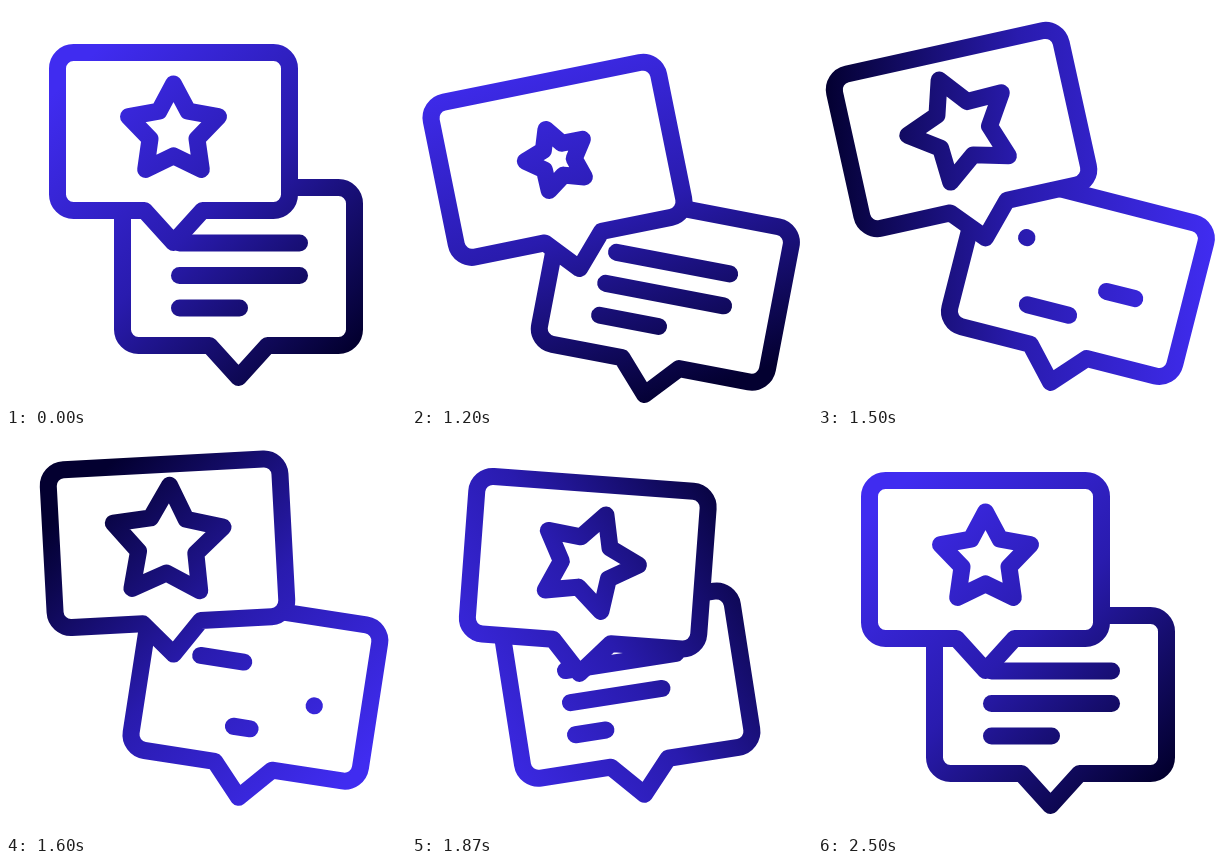
Animation of 400 by 400 pixels, one loop 2.52 s. Source, as an HTML page with a canvas:

```html
<!DOCTYPE html>
<html lang="en">
<head>
<meta charset="utf-8">
<title>Review bubbles</title>
<style>
  html, body { margin: 0; width: 100%; height: 100%; overflow: hidden; background: #fff; }
  canvas { display: block; }
</style>
</head>
<body>
<canvas width="400" height="400"></canvas>
<script>
const ctx = document.querySelector('canvas').getContext('2d');
const LOOP = 2520, DEG = Math.PI / 180;
const clamp = x => Math.min(1, Math.max(0, x));

// Smooth curve through alternating times and values, flat at every extreme.
function track(...keys) {
  const t = keys.filter((_, i) => i % 2 === 0);
  const v = keys.filter((_, i) => i % 2);
  const rate = i => (v[i + 1] - v[i]) / (t[i + 1] - t[i]);
  const slope = t.map((_, i) => {
    if (i === 0 || i === t.length - 1) return 0;
    const a = rate(i - 1), b = rate(i);
    return a * b > 0 ? 2 * a * b / (a + b) : 0;
  });
  return time => {
    if (time <= t[0]) return v[0];
    const i = t.findIndex(k => k > time) - 1;
    if (i < 0) return v[v.length - 1];
    const span = t[i + 1] - t[i], u = (time - t[i]) / span, w = 1 - u;
    return v[i] * w * w * (1 + 2 * u) + v[i + 1] * u * u * (3 - 2 * u)
      + span * u * w * (slope[i] * w - slope[i + 1] * u);
  };
}

const front = {
  x: 167.5, y: 236.5,
  turn: track(1000, 0, 1200, -11.4, 1350, -14.8, 1500, -12.5, 1700, 6.8, 1765, 8.5, 2020, -2.8, 2100, -2, 2350, 0),
  drop: track(1000, 0, 1200, 26, 1225, 27, 1500, -4.5, 1620, -17, 1700, -12, 1950, 6, 2100, 0.4, 2200, 0)
};
const back = {
  x: 232.5, y: 371.5,
  turn: track(1000, 0, 1200, 10.8, 1440, 14.8, 1500, 14.3, 1550, 12.8, 1700, -1.3, 1850, -9, 2100, 0.7, 2220, 3, 2500, 0),
  drop: track(1000, 0, 1200, 17, 1290, 24, 1500, 5, 1700, -18.5, 1730, -19.5, 2100, 8.5, 2115, 8.7, 2500, 0)
};
const starTurn = track(1000, 0, 1200, -9.6, 1350, -14, 1500, -12, 1700, 24.6, 1765, 28, 2040, -6, 2100, -5.1, 2400, 0);
const starSize = track(1000, 1, 1200, 0.68, 1250, 0.63, 1500, 1.14, 1600, 1.22, 1700, 1.163, 2100, 1);
const lightTurn = track(1000, 45, 1200, 70, 1500, 180, 1700, 267, 2100, 385, 2500, 405);

// Bubble outline with the tip of its tail at the origin.
const outline = new Path2D();
outline.moveTo(0, 0);
outline.lineTo(-29, -32);
for (const [x1, y1, x2, y2] of [
  [-116, -32, -116, -111], [-116, -190, 0, -190],
  [116, -190, 116, -111], [116, -32, 29, -32]
]) outline.arcTo(x1, y1, x2, y2, 16);
outline.lineTo(29, -32);
outline.closePath();

function drawBubble({ x, y, turn, drop }, time, content) {
  ctx.save();
  ctx.translate(x, y + drop(time));
  ctx.rotate(turn(time) * DEG);
  ctx.fill(outline);
  ctx.stroke(outline);
  content(time);
  ctx.restore();
}

function drawLines(time) {
  [120, 120, 60].forEach((length, i) => {
    const y = -134.5 + i * 32.5, local = time - i * 110;
    const erase = clamp((local - 1160) / 340);
    const grow = clamp((local - 1500) / 500);
    const growing = local >= 1500;
    const from = growing ? 0 : erase * erase * (3 - 2 * erase);
    const to = growing ? 1 - (1 - grow) ** 2 : 1;
    ctx.beginPath();
    ctx.moveTo(-59 + from * length, y);
    ctx.lineTo(-58.99 + to * length, y);
    ctx.stroke();
  });
}

function drawStar(time) {
  const size = starSize(time);
  ctx.translate(0, -111.3);
  ctx.rotate(starTurn(time) * DEG);
  ctx.beginPath();
  for (let i = 0; i < 10; i++) {
    const r = size * (i % 2 ? 24.7 : 47.3), a = (i * 36 - 90) * DEG;
    ctx.lineTo(r * Math.cos(a), r * Math.sin(a));
  }
  ctx.closePath();
  ctx.stroke();
}

// Tints everything black with one gradient that turns about the centre.
function drawLight(time) {
  const a = lightTurn(time) * DEG, dx = 195 * Math.cos(a), dy = 195 * Math.sin(a);
  const light = ctx.createLinearGradient(200 - dx, 210 - dy, 200 + dx, 210 + dy);
  light.addColorStop(0, '#402cf0');
  light.addColorStop(0.5, '#291bae');
  light.addColorStop(1, '#030030');
  ctx.save();
  ctx.globalCompositeOperation = 'screen';
  ctx.fillStyle = light;
  ctx.fillRect(0, 0, 400, 400);
  ctx.restore();
}

const start = performance.now();
function draw() {
  const time = (performance.now() - start) % LOOP;
  ctx.fillStyle = '#fff';
  ctx.strokeStyle = '#000';
  ctx.lineWidth = 17;
  ctx.lineCap = ctx.lineJoin = 'round';
  ctx.fillRect(0, 0, 400, 400);
  drawBubble(back, time, drawLines);
  drawBubble(front, time, drawStar);
  drawLight(time);
  requestAnimationFrame(draw);
}
draw();
</script>
</body>
</html>
```
